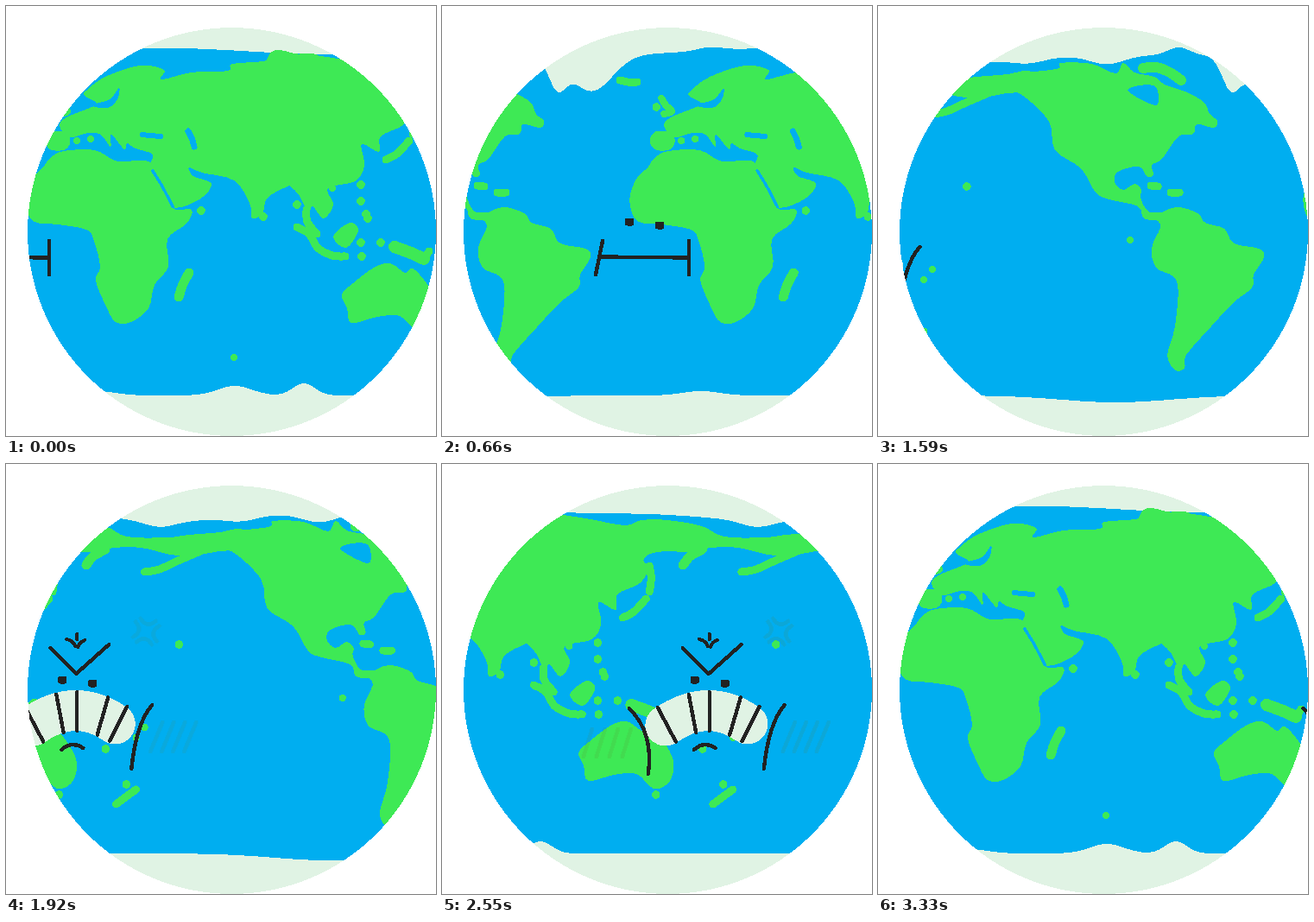
An HTML page that plays this animation: 498 by 498 pixels, repeating every 3360 ms.

```html
<!DOCTYPE html>
<html lang="en">
<head>
<meta charset="utf-8">
<title>Spinning globe</title>
<style>
html, body { margin: 0; width: 100%; height: 100%; overflow: hidden; background: #fff; }
svg { display: block; width: 498px; height: 498px; shape-rendering: crispEdges; }
path { stroke-linecap: round; stroke-linejoin: round; }
</style>
</head>
<body>
<svg viewBox="0 0 498 498">
  <defs><g id="map"></g></defs>
  <rect width="498" height="498" fill="#00aef0"/>
  <use href="#map" id="mapA"/>
  <use href="#map" id="mapB"/>
  <g id="calm"></g>
  <g id="angry"></g>
  <path fill="#fff" fill-rule="evenodd"
    d="M0 0H498V498H0ZM25 261.5a236.5 236.5 0 0 0 473 0a236.5 236.5 0 0 0 -473 0Z"/>
</svg>
<script>
const SEA = '#00aef0', LAND = '#3ee955', ICE = '#e0f3e4', INK = '#222';
const STEP = 30, STEPS = 112, WIDTH = 985;
const MAP_SPEED = WIDTH / (STEPS - 1);
const $ = id => document.getElementById(id);

const points = (text, dx = 0) => text.trim().split(/\s+/).map(p => {
  const [x, y] = p.split(',').map(Number);
  return [x + dx, y];
});

// Smooth curve through all points
function curve(p, closed) {
  const n = p.length;
  const at = i => closed ? p[(i + n) % n] : p[Math.max(0, Math.min(n - 1, i))];
  let d = `M${p[0]}`;
  for (let i = 0; i < (closed ? n : n - 1); i++) {
    const [a, b, c, e] = [at(i - 1), at(i), at(i + 1), at(i + 2)];
    const c1 = [0, 1].map(k => (b[k] + (c[k] - a[k]) / 6).toFixed(1));
    const c2 = [0, 1].map(k => (c[k] - (e[k] - b[k]) / 6).toFixed(1));
    d += `C${c1} ${c2} ${c}`;
  }
  return d + (closed ? 'Z' : '');
}

const stroke = (d, w = 4.4, color = INK) =>
  `<path d="${d}" fill="none" stroke="${color}" stroke-width="${w}"/>`;
const blob = (dx, text, fill = LAND) =>
  `<path d="${curve(points(text, dx), true)}" fill="${fill}"/>`;
const line = (dx, text, w = 9, color = LAND) => stroke(curve(points(text, dx)), w, color);
const dots = (dx, text, r = 4.8) =>
  points(text, dx).map(([x, y]) => `<circle cx="${x}" cy="${y}" r="${r}" fill="${LAND}"/>`).join('');

// Ice edge: a level plus bell-shaped bumps [centre, height, width] that wrap around the globe
function cap(level, bumps, side) {
  let d = `M-350 ${side}`;
  for (let x = -350; x <= 750; x += 4) {
    const y = bumps.reduce((sum, [c, h, w]) => {
      const gap = (x - c) - WIDTH * Math.round((x - c) / WIDTH);
      return sum + h * Math.exp(-((gap / w) ** 2));
    }, level);
    d += `L${x} ${y.toFixed(1)}`;
  }
  return `<path d="${d}V${side}Z" fill="${ICE}"/>`;
}

const ice =
  cap(57, [[-62, 32, 14], [-22, 42, 34], [-122, -9, 18], [190, -8, 120], [115, -4, 20],
    [610, 9, 95], [595, 7, 25], [690, 5, 25], [780, 10, 28]], 0) +
  cap(451, [[790, 8, 90], [265, -11, 28], [345, -14, 18], [105, -5, 30]], 498);

const africa = blob(-195, `246,176 262,168 298,167 324,180 360,180 374,206 388,234 410,236 404,252
  382,270 383,302 367,323 360,350 340,366 322,366 311,348 299,318 304,302 297,272 288,259 255,253
  226,249 217,225 225,200 238,187`);

const westAsia = blob(0, `93,98 115,82 155,69 183,74 180,85 215,77 257,75 262,67 298,64 330,56
  372,70 372,190 328,208 303,222 297,240 285,246 282,228 264,202 227,193 212,187 217,197 238,206
  224,224 193,233 178,206 167,186 170,172 150,165 140,159 137,166 122,149 121,163 110,149 95,147
  74,152 62,139 70,129 97,118 106,113 91,104`);

const eastAsia = blob(142, `160,62 200,56 255,63 300,71 320,65 350,65 390,72 415,84 462,85 517,80
  547,75 555,88 517,102 474,106 432,97 400,97 375,102 350,101 330,104 322,112 328,120 318,138
  292,151 290,169 270,160 273,185 262,203 231,211 237,230 226,246 213,232 208,240 198,220 186,207
  160,180`);

const northAmerica = blob(514.7, `95,86 150,79 206,73 212,66 247,67 275,78 284,66 297,77 320,82
  332,91 358,100 378,112 384,125 393,133 389,141 369,137 365,148 348,151 329,177 317,184 319,195
  312,198 302,186 278,192 274,204 284,213 297,206 305,213 304,222 313,238 331,240 330,248 308,246
  301,232 268,224 252,216 235,188 205,167 198,134 168,104 150,101 100,106`);

const southAmerica = blob(-337.2, `190,244 212,233 237,240 246,251 268,258 279,275 308,281 314,291
  302,311 300,326 278,344 252,372 224,404 222,419 212,422 202,405 211,370 213,319 189,303 184,280
  194,256`);

const australia = blob(142, `247,334 260,321 284,303 303,298 320,309 329,304 345,321 357,345
  352,368 334,376 314,359 288,360 258,367 253,350`);

const seas =
  blob(0, '131,95 129,108 118,118 99,115 120,108', SEA) +
  line(0, '158,149 167,150 179,151', 6, SEA) +
  line(0, '211,145 215,153 218,163', 7, SEA) +
  blob(514.7, '290,99 303,92 322,94 322,115', SEA) +
  line(0, '170,191 181,209 193,232', 3.5, SEA);

const islands =
  line(-195, '252,156 258,156', 23) +
  line(0, '212,309 205,322 200,337', 11) +
  blob(0, '379,267 398,251 408,260 394,280') +
  line(0, '337,256 351,264 361,280 378,289 393,290') +
  line(0, '348,236 349,250 360,264') +
  line(0, '450,279 469,286 484,293', 14) + line(0, '484,293 490,284') +
  line(142, '298,178 311,171 325,156') +
  line(142, '329,118 331,132 329,148') +
  line(142, '368,117 376,107 390,99', 11) +
  line(319.5, '258,125 275,122 297,112 325,100') +
  line(319.5, '225,394 248,377') +
  line(514.7, '307,72 322,71 338,77 351,86', 12) +
  line(-337.2, '183,208 191,209') +
  line(-337.2, '206,216 216,216') +
  line(-337.2, '348,86 357,88 368,88') +
  line(-195, '254,107 259,115 266,122 257,125', 8) +
  dots(-195, '248,117') +
  dots(-337.2, '159,271', 4) +
  dots(0, `226,237 298,244 337,230 411,207 411,226 417,241 419,246 411,274 412,290 434,274`) +
  dots(0, '82,156 98,154 378,211 264,407', 4.2) +
  dots(319.5, '298,209 237,371 213,330 159,383') +
  dots(514.7, '53,317 63,305', 4);

$('map').innerHTML = ice + africa + westAsia + eastAsia + northAmerica + southAmerica +
  australia + seas + islands;

const eyes = (x, y) => [[x, y], [x + 35, y + 4]].map(([ex, ey]) =>
  `<rect x="${ex - 5}" y="${ey - 4.5}" width="10" height="9" rx="2.5" fill="${INK}"/>`).join('');

const teeth = [-60, -24, 0, 36, 58].map(x =>
  `M${202 + x} ${264 + 0.005 * x * x}L${202 + 0.65 * x} ${309 + 0.0035 * x * x}`).join('');

let blush = '';
for (let i = 0; i < 4; i++) {
  blush += `M${66 + 15 * i} 307l-10 32M${301 + 13 * i} 299l-14 34`;
}
const anger = [0, 90, 180, 270].map(a =>
  `<path d="M-9 -14Q0 -3 9 -14" transform="translate(282 194) rotate(${a + 10})"/>`).join('');

$('calm').innerHTML = eyes(217, 250) +
  stroke('M186 272L178 311M183 290.5L286 291.5M286 272V311');

$('angry').innerHTML =
  `<g id="marks" stroke="#64782a" stroke-width="4.5" fill="none"><path d="${blush}"/>${anger}</g>` +
  stroke('M151 303Q200 269 246 301', 47, ICE) +
  stroke(teeth) +
  stroke('M171 213L201 243L239 209M184 331Q196 320 209 329') +
  stroke('M109 283C126 300 136 325 131 359M289 279C274 296 268 325 265 353') +
  stroke('M202 197V203M190 203Q197 204 200 211M203 212Q205 206 211 204', 4) +
  eyes(185, 250);

const shift = (id, x) => $(id).setAttribute('transform', `translate(${x.toFixed(2)} 0)`);

function draw(time) {
  const n = Math.floor(time / STEP) % STEPS;
  const late = n - 75;
  shift('mapA', n * MAP_SPEED);
  shift('mapB', n * MAP_SPEED - WIDTH);
  shift('calm', (n - 22) * 10.72);
  // The angry face slows slightly on its way across
  shift('angry', late * (10.83 - 0.005 * late));
  const fade = Math.max(0, Math.min(1, (15 - Math.abs(late)) / 8));
  $('marks').setAttribute('opacity', (0.2 * fade).toFixed(3));
}

const start = performance.now();
function tick() {
  draw(performance.now() - start);
  requestAnimationFrame(tick);
}
tick();
</script>
</body>
</html>
```
